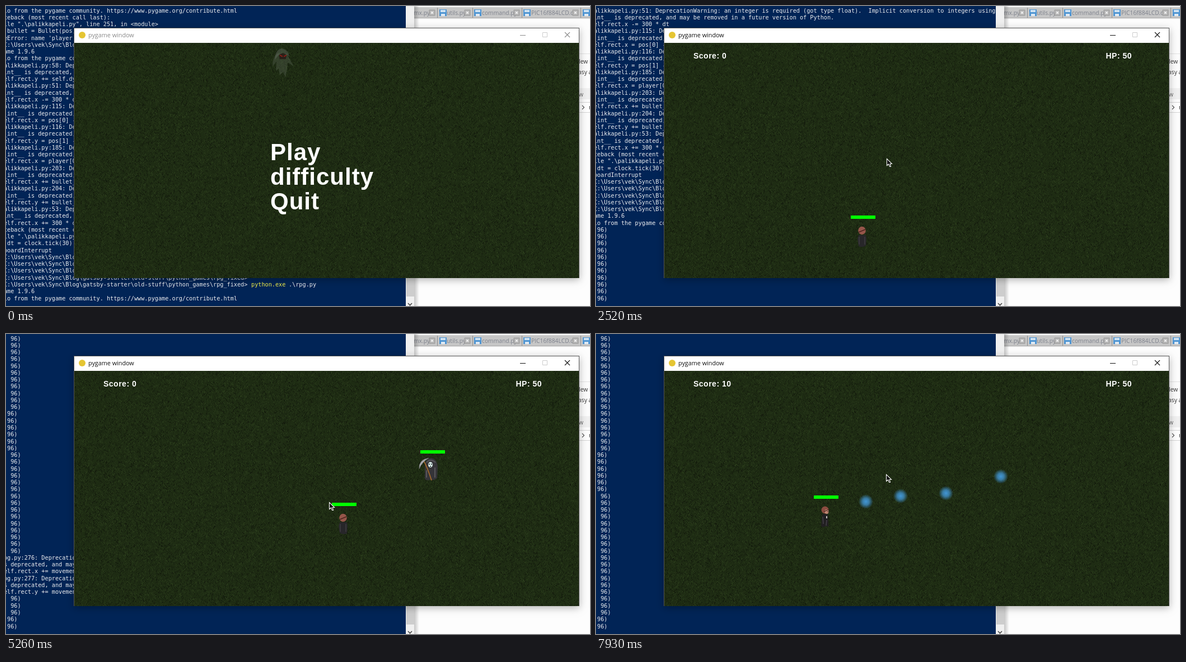
These frames come from a looping animation (1043 px wide and 537 px high, 8000 ms). An HTML page with a canvas:

```html
<!DOCTYPE html>
<html lang="en">
<head>
<meta charset="utf-8">
<title>pygame window</title>
<style>
  html, body { margin: 0; width: 100%; height: 100%; overflow: hidden; background: #fff; }
  canvas { display: block; }
</style>
</head>
<body>
<canvas id="stage" width="1043" height="537"></canvas>
<script>
const W = 1043, H = 537, LOOP = 8000, STEP = 78.5, GAME = 2113;
const ctx = document.getElementById('stage').getContext('2d');
const MONO = '10.2px "DejaVu Sans Mono", monospace';
const UI = '"Open Sans", "Noto Sans", sans-serif';
const BOLD = '"Liberation Sans", Arial, sans-serif';

/* ---------- motion ---------- */
// The picture is refreshed in even steps.
const snap = t => Math.floor(t / STEP + 0.1) * STEP;

// Linear interpolation between key points [time, x, y].
function at(keys, t) {
  const next = keys.findIndex(k => k[0] >= t);
  if (next < 0) return keys[keys.length - 1].slice(1);
  if (next === 0) return keys[0].slice(1);
  const [t0, x0, y0] = keys[next - 1], [t1, x1, y1] = keys[next];
  const k = (t - t0) / (t1 - t0);
  return [x0 + (x1 - x0) * k, y0 + (y1 - y0) * k];
}

const CURSOR = [[70, 880, 448], [820, 508, 276], [2200, 508, 276], [3140, 541, 268], [5260, 577, 301],
  [5420, 690, 328], [5750, 697, 275], [6200, 705, 239], [6550, 690, 282], [6830, 684, 257],
  [7300, 640, 292], [7930, 518, 251]];
// centre and top of the health bar; the figure hangs below it
const PLAYER = [[2920, 477, 375], [3140, 477, 350], [5260, 604, 302], [5490, 601, 308], [6200, 499, 324],
  [6500, 460, 352], [6830, 433, 346], [7930, 411, 289]];
const cursor = t => at(CURSOR, t);
const player = t => { const [x, y] = at(PLAYER, t); return [x - 2, y + 38]; };
const enemy = t => [758 - 0.047 * (t - 5260), 242 + 0.019 * Math.max(0, t - 6100)];

// A shot flies straight from one point towards another.
function shoot(fired, [x, y], [tx, ty]) {
  const d = Math.hypot(tx - x, ty - y), speed = 0.4;
  const pos = t => [x + (tx - x) / d * speed * (t - fired), y + (ty - y) / d * speed * (t - fired)];
  return { fired, gone: LOOP, pos };
}
const SHOT_TIMES = [5436, 5640, 5828, 6075, 6390, 6592, 7135, 7390, 7583, 7735];
const shots = SHOT_TIMES.map(t => {
  const [x, y] = player(t);
  return shoot(t, [x, y - 3], cursor(t));
});
const fireball = shoot(6527, enemy(6527), player(6527));

// The enemy falls at the fifth hit.
const hits = [];
for (const s of shots) {
  for (let t = s.fired; t < LOOP && hits.length < 5; t += 10) {
    const [x, y] = s.pos(t), [ex, ey] = enemy(t);
    if (x < ex) continue;
    if (Math.abs(y - ey) < 60) hits.push(s.gone = t);
    break;
  }
}
const death = hits[hits.length - 1];

/* ---------- console log ---------- */
const wrap = s => s.length > 120 ? [s.slice(0, 120), s.slice(120)] : [s];
const warn = (file, line, code) => [
  ...wrap(`.\\${file}:${line}: DeprecationWarning: an integer is required (got type float).  ` +
    'Implicit conversion to integers using __int__ is deprecated, and may be removed in a future version of Python.'),
  '  self.rect.' + code];
const block = (line, code) => warn('palikkapeli.py', line, code);
const both = (line, name) => [
  ...warn('rpg.py', line, `x += ${name}[0]`), ...warn('rpg.py', line + 1, `y += ${name}[1]`)];
const PROMPT = 'PS C:\\Users\\vek\\Sync\\Blog\\gatsby-starter\\old-stuff\\python_games\\rpg_fixed> ';
const HELLO = ['pygame 1.9.6', 'Hello from the pygame community. https://www.pygame.org/contribute.html'];
const TRACE = 'Traceback (most recent call last):';
const inFile = n => `  File ".\\palikkapeli.py", line ${n}, in <module>`;

const log = [
  HELLO[1], TRACE, inFile(251), '    bullet = Bullet(pos, player)', "NameError: name 'player' is not defined",
  PROMPT, ...HELLO,
  ...block(58, 'y += self.dy'), ...block(51, 'x -= 300 * dt'),
  ...block(115, 'x = pos[0] - 16'), ...block(116, 'y = pos[1] - 16'),
  ...block(185, 'x = player[0]'), ...block(203, 'x += bullet_vector[0]'),
  ...block(204, 'y += bullet_vector[1]'), ...block(53, 'x += 300 * dt'),
  TRACE, inFile(260), '    dt = clock.tick(30)', 'KeyboardInterrupt',
  PROMPT, PROMPT, PROMPT, PROMPT, PROMPT + 'python.exe .\\rpg.py', ...HELLO];
const ROWS = log.length;
const ends = [];   // log length after each number of prints
for (let n = 0; n < 170; n++) {
  ends.push(log.length);
  if (n === 80) log.push(...both(276, 'movement'));
  if (n === 91) log.push(...both(35, 'bullet_vector'));
  log.push(n < 22 || (n + 13) % 24 < 6 ? '(0, 96)' : '(32, 96)');
}

function drawConsole(t) {
  rect('#012456', 0, 0, 714, H);
  ctx.font = MONO;
  const prints = Math.round(Math.max(0, t - GAME) * 0.027);
  const top = ends[prints] - ROWS;
  for (let i = 0; i < ROWS; i++) {
    const s = log[top + i], y = 11.6 + i * 12.26, cmd = s.indexOf('python.exe');
    text(s, -22.5, y, '#eeedf0');
    if (cmd > 0) {
      const x = -22.5 + cmd * 6.14;
      rect('#012456', x, y - 9, 62, 12);
      text('python.exe', x, y, '#f6f04a');
    }
  }
}

/* ---------- drawing helpers ---------- */
function rect(c, x, y, w, h) { ctx.fillStyle = c; ctx.fillRect(x, y, w, h); }
function text(s, x, y, c) { ctx.fillStyle = c; ctx.fillText(s, x, y); }
function disc(c, x, y, rx, ry = rx) {
  ctx.fillStyle = c;
  ctx.beginPath();
  ctx.ellipse(x, y, rx, ry, 0, 0, 7);
  ctx.fill();
}
function shape(d, fill, stroke, width = 1) {
  const p = new Path2D(d);
  if (fill) { ctx.fillStyle = fill; ctx.fill(p); }
  if (stroke) { ctx.strokeStyle = stroke; ctx.lineWidth = width; ctx.stroke(p); }
}
function place([x, y], draw, alpha = 1) {
  ctx.save();
  ctx.translate(Math.round(x), Math.round(y));
  ctx.globalAlpha = alpha;
  draw();
  ctx.restore();
}
function label(s, x, y, size, gap) {
  ctx.font = `bold ${size}px ${BOLD}`;
  ctx.letterSpacing = gap + 'px';
  text(s, x, y, '#fff');
  ctx.letterSpacing = '0px';
}

/* ---------- grass ---------- */
const grass = (() => {
  const c = document.createElement('canvas');
  c.width = 901; c.height = 421;
  const g = c.getContext('2d');
  let seed = 7;
  const rnd = n => (seed = (seed * 16807) % 2147483647) % n;
  g.fillStyle = '#1e2c13';
  g.fillRect(0, 0, 901, 421);
  for (let i = 0; i < 75000; i++) {
    const l = 25 + rnd(36), x = rnd(901), y = rnd(421), lean = rnd(3) - 1;
    g.fillStyle = `rgb(${l * 0.7},${l},${l * 0.45})`;
    for (let k = 0; k < 3; k++) g.fillRect(x + lean * k, y + k, 1, 1);
  }
  return c;
})();

/* ---------- desktop ---------- */
function drawTab(name, x, close) {
  ctx.font = `10.3px ${UI}`;
  text(name, x, 16, '#7d818c');
  shape(`M${close} 7h10v10h-10z`, '#b4b4b4', '#999');
  shape(`M${close + 3} 10l4 4m0-4l-4 4`, null, '#f4f4f4', 1.5);
  rect('#8d8d8d', close + 14, 3, 1, 18);
}
function drawDisk(x) {
  rect('#4f95d2', x, 6, 13, 12);
  rect('#cfe2f2', x + 2, 7, 9, 4);
  rect('#dfeaf4', x + 3, 14, 7, 4);
}
function drawDesktop() {
  rect('#fdfdfd', 714, 0, W - 714, H);
  rect('#c6c6c6', 729, 2, W - 729, 19);
  rect('#a8a8a8', 729, 21, W - 729, 1);
  rect('#f3f3f3', 729, 22, W - 729, 2);
  drawTab('mx.py', 728, 756);
  drawTab('utils.py', 787, 819);
  drawTab('command.py', 850, 907);
  drawTab('PIC16f884LCD.c', 938, 1012);
  [774, 836, 924, 1030].forEach(drawDisk);
  rect('#e2e2e2', 1023, 85, 20, 1);
  rect('#f1f1f1', 1023, 147, 20, 20);
  shape('M1020 172.5h40v18h-40', '#fff', '#d4d4d4');
  ctx.font = `10.3px ${UI}`;
  text('New i', 1018, 103, '#333');
  text('asy a', 1022, 122, '#333');
  text('w', 1023, 162, '#666');
  text('r', 1041, 185, '#333');
  shape('M1029 178l3.5 3.5l-3.5 3.5', null, '#555', 1.2);

  rect('#f0f0f0', 714, 0, 15, H);
  rect('#cdcdcd', 715, 480, 14, 40);
  shape('M718 532l3.5 3.5l3.5-3.5', null, '#444', 1.6);
  const fade = ctx.createLinearGradient(729, 0, 738, 0);
  fade.addColorStop(0, 'rgba(0,0,0,.22)');
  fade.addColorStop(1, 'rgba(0,0,0,0)');
  rect(fade, 729, 0, 9, H);
}

/* ---------- game window ---------- */
function drawWindow(active) {
  const ink = active ? '#111' : '#8a8a8a';
  ctx.save();
  ctx.shadowColor = 'rgba(0,0,0,.3)';
  ctx.shadowBlur = 13;
  ctx.shadowOffsetY = 3;
  rect('#555', 121, 39, 903, 448);
  ctx.restore();
  rect('#fff', 122, 40, 901, 26);
  disc('#e5c532', 136, 52, 6);
  ctx.font = `10.8px ${UI}`;
  text('pygame window', 147, 56, ink);
  shape('M918 52.5h10', null, ink);
  shape('M958.5 47.5h8v8h-8z', null, '#ccc');
  shape('M998 47l9 9m0-9l-9 9', null, ink, 1.1);
  ctx.drawImage(grass, 122, 66);
}

function drawGhost(t) {
  const spot = [493 + 0.129 * t, 100 + 0.002 * t], k = Math.min(1, t / 1500);
  place(spot, () => {
    const robe = `rgb(${85 - 20 * k},${98 - 52 * k},${82 - 40 * k})`;
    shape('M-9-15Q-18-6-17 8L-10 0L-11 16L-6 12L-4 24L2 18L6 28L9 13L10 1L21 8Q14-5 8-15Z', robe);
    shape('M-13-4Q-12-23 0-24Q11-22 13-10L8-13Q2-19-6-12Z', `rgb(${105 - 20 * k},${115 - 30 * k},${105 - 20 * k})`);
  }, 0.4 + 0.35 * k);
  place(spot, () => {
    shape('M-6-12Q1-18 8-12L7-5L-4-5Z', '#241514');
    shape('M-4-12l5 2.5M8-12l-5 2.5', null, '#b01c14', 1.8);
  }, 0.75);
}

function drawMenu(t) {
  drawGhost(t);
  if (t > 700) rect('#000', 473, 241, 236, 44);
  ['Play', 'difficulty', 'Quit'].forEach((s, i) => label(s, 472, 276 + 44 * i, 42, 1));
}

function drawBar(x, y, green) {
  x = Math.round(x); y = Math.round(y);
  rect('#f00', x, y, 44, 6);
  rect('#0f0', x, y, green, 6);
}

function drawPlayer(t) {
  const [x, y] = player(t);
  const side = t > 5500, walk = t > 2920 ? Math.floor(t / 210) % 2 : 0;
  place([x, y], () => {
    if (side) {
      shape(`M-5-4Q0-7 5-4L6 6L${7 - walk} 18L1 17L-3 19L${-9 + walk * 2} 17L-6 6Z`, '#211f21');
      shape('M-4 0L-3 13M3 6L2 16', null, '#444047', 1.5);
      rect('#c8c4c0', 2, -1, 2, 4);
      disc('#8a4c40', 0, -12, 6.5);
      disc('#c08672', 3, -9, 3.5, 4);
      shape('M-2-9L7-13M4-9h2', null, '#41211c', 1.2);
    } else {
      shape(`M-6-3H7L8 4L7 ${16 + walk}Q0 20-6 ${17 - walk}L-8 4Z`, '#272629');
      shape('M-5 0V14M5 0V14', null, '#38363a', 2);
      disc('#96564a', 0, -11, 6.8, 7.2);
      shape('M-6-8L6-13', null, '#4b241e', 1.4);
    }
  });
  drawBar(x - 20, y - 38, 44);
}

function drawEnemy(t) {
  if (t < 5175 || t >= death) return;
  const [x, y] = enemy(t), back = Math.floor(t / 250) % 2 === 0;
  place([x, y], () => {
    if (back) {
      shape('M-9-10Q-4-21 5-18Q10-14 8-5L6 6L10 19L2 20L-4 14L-6 0Z', '#4a484b');
      shape('M-7-11Q0-17 7-10M3-3L5 17', null, '#69676a', 2);
    } else {
      shape('M-10-7Q-8-20 2-20Q12-18 13-4L12 16Q6 21 0 19Q-8 21-10 17Z', '#353438');
      shape('M-7-12Q0-20 9-12M8-3V15M-7 2V15', null, '#57565a', 2);
      disc('#d4e6e2', 0, -8, 4, 5);
      shape('M-3-9h2m2 0h2M-1-5h2', null, '#20282a', 1.6);
      shape('M-13-17Q-6-5 2 20', null, '#a2682b', 1.8);
      shape('M-20-1Q-21-17-3-20Q-15-13-20-1Z', '#a9a9ad', '#747478', 0.8);
    }
  });
  drawBar(x - 18, y - 34, 44 - 7.3 * hits.filter(h => h <= t).length);
}

function drawShot(shot, t, rgb) {
  if (t < shot.fired || t >= shot.gone) return;
  place(shot.pos(t), () => {
    const g = ctx.createRadialGradient(0, 0, 0, 0, 0, 13);
    g.addColorStop(0, `rgb(${rgb})`);
    g.addColorStop(0.45, `rgba(${rgb},.75)`);
    g.addColorStop(1, `rgba(${rgb},0)`);
    disc(g, 0, 0, 13);
  });
}

function drawGame(t) {
  drawPlayer(t);
  shots.forEach(s => drawShot(s, t, '66,150,212'));
  drawShot(fireball, t, '140,66,14');
  drawEnemy(t);
  label(t >= death ? 'Score: 10' : 'Score: 0', 174, 94, 14, 0.5);
  label('HP: 50', 910.5, 94, 14, 0.5);
}

function drawCursor(t) {
  if (t < 70) return;
  const pressed = t >= shots[0].fired && t < death;
  place(cursor(t), () => {
    if (pressed) disc('rgba(184,176,24,.88)', -0.5, 0, 10.5);
    ctx.translate(0.5, 0.5);
    shape('M0 0V12L3 9.5L5 14H7L5.5 9H9Z', '#000', '#fff', 1.1);
  });
}

function draw(t) {
  const playing = t >= GAME;
  drawConsole(t);
  drawDesktop();
  drawWindow(playing);
  ctx.save();
  ctx.beginPath();
  ctx.rect(122, 66, 901, 421);
  ctx.clip();
  (playing ? drawGame : drawMenu)(t);
  drawCursor(t);
  ctx.restore();
}

const start = performance.now();
let shown = -1;
function tick() {
  const t = snap((performance.now() - start) % LOOP);
  if (t !== shown) draw(shown = t);
  requestAnimationFrame(tick);
}
tick();
</script>
</body>
</html>
```
